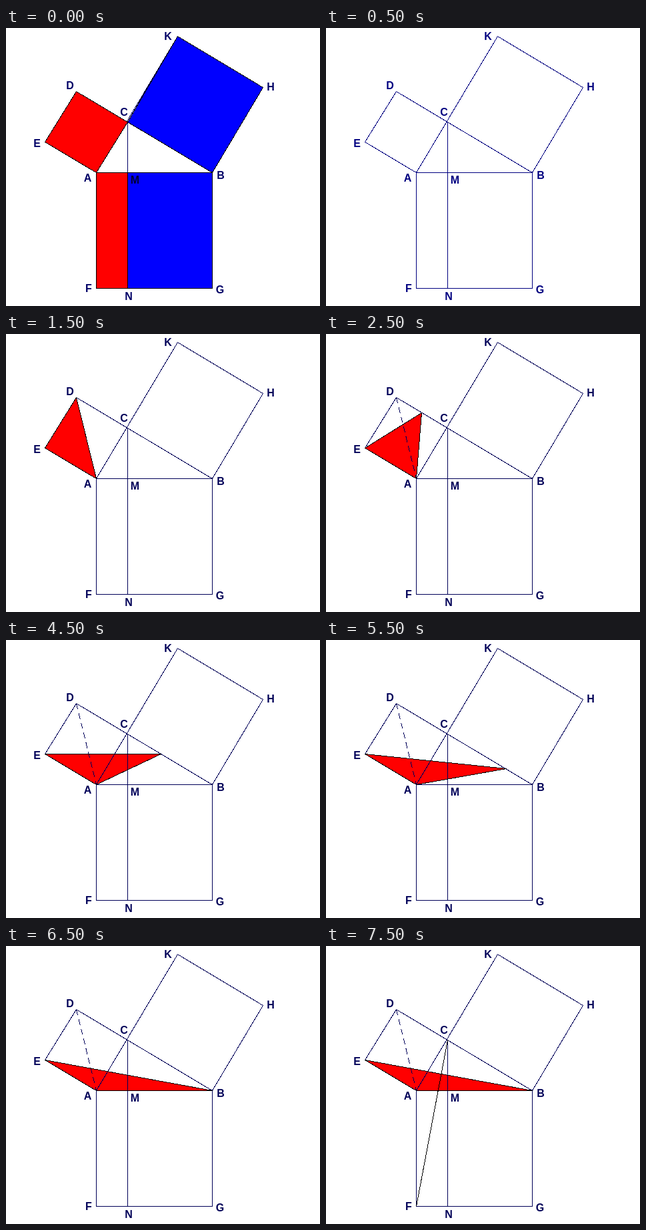
An HTML page that plays this animation: 471x418 px, repeating every 8 s.

```html
<!DOCTYPE html>
<html lang="en">
<head>
<meta charset="utf-8">
<title>Squares on a right triangle</title>
<style>
html, body { margin: 0; width: 100%; height: 100%; overflow: hidden; background: #fff; }
svg { display: block; color: #000058; animation: ink 8s step-end infinite; }
.lines path { fill: none; stroke: currentColor; shape-rendering: crispEdges; }
.solid path { stroke: #000; shape-rendering: crispEdges; }
text { font: bold 16px "Liberation Sans", Arial, sans-serif; text-anchor: middle; fill: currentColor; }
.solid { animation: solid 8s step-end infinite; }
.sheared { visibility: hidden; animation: show 8s step-end infinite; }
.area, .edge { d: path("M58 171L135 217L105 95Z"); shape-rendering: crispEdges; }
.area { fill: #f00; }
.edge { fill: none; stroke: #000; }
.area, .edge { animation: shear 8s step-end infinite; }
.lines .dash { stroke-dasharray: 9 6; visibility: hidden; animation: dash 8s step-end infinite; }
.lines .cut { stroke: #000; visibility: hidden; animation: cut 8s step-end infinite; }
.m { animation: label 8s step-end infinite; }

@keyframes ink { 0% { color: #000066; } 6.25% { color: #000080; } 18.75%, 100% { color: #000058; } }
@keyframes label { 0% { fill: #000033; } 6.25%, 100% { fill: currentColor; } }
@keyframes solid { 0% { visibility: visible; } 6.25%, 100% { visibility: hidden; } }
@keyframes show { 0% { visibility: hidden; } 18.75%, 100% { visibility: visible; } }
@keyframes dash { 0% { visibility: hidden; } 31.25%, 100% { visibility: visible; } }
@keyframes cut { 0% { visibility: hidden; } 93.75%, 100% { visibility: visible; } }
/* The apex slides along DB, keeping the area constant. */
@keyframes shear {
  0%, 18.75% { d: path("M58 171L135 217L105 95Z"); }
  31.25% { d: path("M58 171L135 217L143 118Z"); }
  43.75% { d: path("M58 171L135 217L199 152Z"); }
  56.25% { d: path("M58 171L135 217L232 171Z"); }
  68.75% { d: path("M58 171L135 217L270 193Z"); }
  81.25%, 100% { d: path("M58 171L135 217L309 217Z"); }
}
</style>
</head>
<body>
<svg width="471" height="418" viewBox="0 0 471 418">
  <g transform="translate(.5 .5)">
    <g class="sheared"><path class="area"/></g>
    <g class="lines">
      <path d="M135 217H309V391H135Z"/>
      <path d="M182 141V391"/>
      <path d="M135 217L58 171L105 95L309 217"/>
      <path d="M135 217L257 12L385 89L309 217"/>
      <path class="dash" d="M105 95L135 217"/>
      <path class="cut" d="M182 141L135 391"/>
    </g>
    <g class="sheared"><path class="edge"/></g>
    <g class="solid">
      <path fill="#f00" d="M135 217L58 171L105 95L182 141Z"/>
      <path fill="#00f" d="M182 141L257 12L385 89L309 217Z"/>
      <path fill="#f00" d="M135 217H182V391H135Z"/>
      <path fill="#00f" d="M182 217H309V391H182Z"/>
    </g>
  </g>
  <text x="243" y="18">K</text>
  <text x="397" y="94">H</text>
  <text x="96" y="92">D</text>
  <text x="177" y="132">C</text>
  <text x="46.5" y="179">E</text>
  <text x="122.5" y="231">A</text>
  <text x="322" y="227">B</text>
  <text class="m" x="193.5" y="234">M</text>
  <text x="124" y="397">F</text>
  <text x="321" y="399">G</text>
  <text x="184" y="409">N</text>
</svg>
</body>
</html>
```
